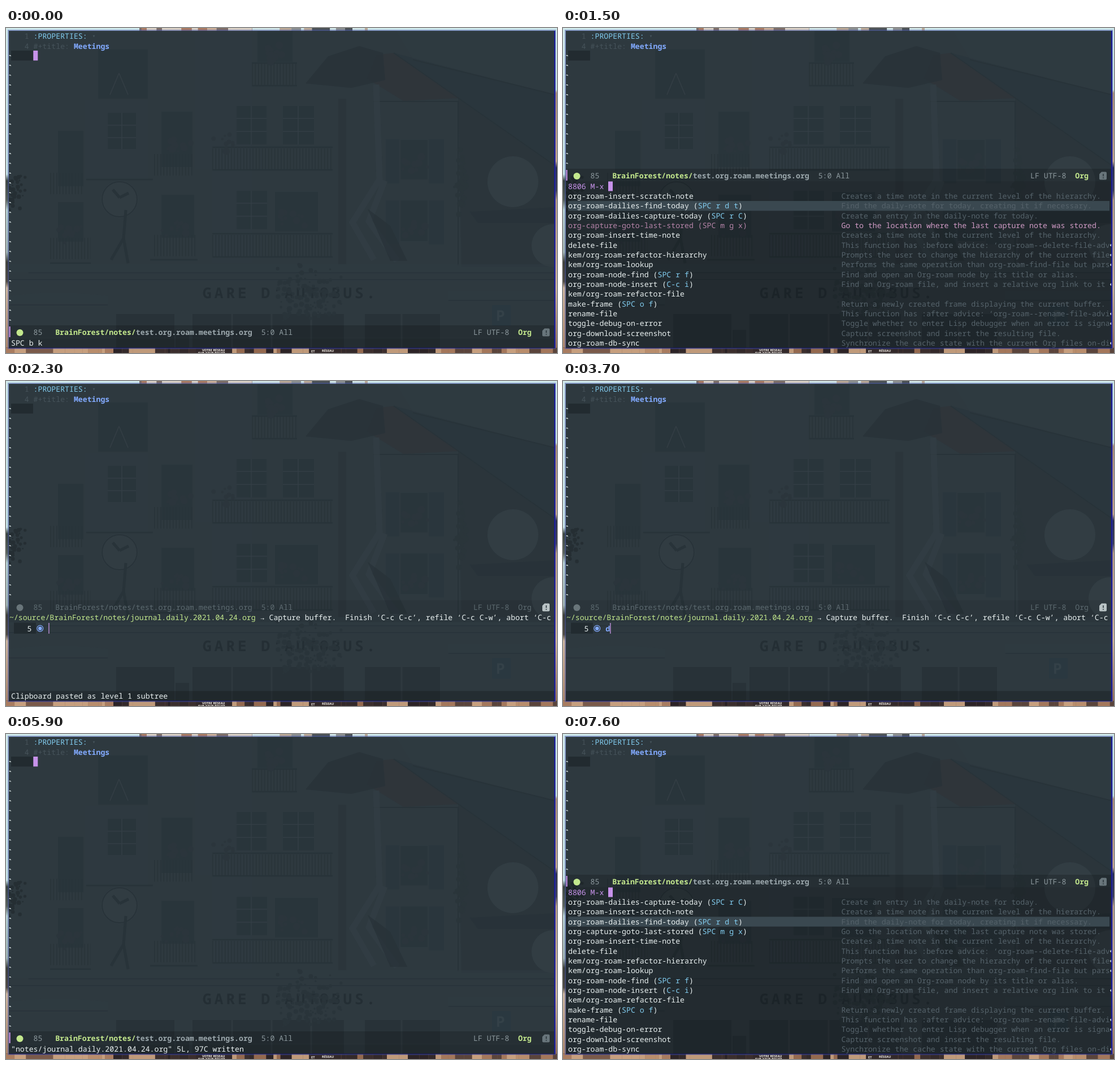
An HTML page that plays this animation: 975x575 px, repeating every 8000 ms.

```html
<!DOCTYPE html>
<html lang="en">
<head>
<meta charset="utf-8">
<title>Daily capture</title>
<style>
  html, body { margin: 0; width: 100%; height: 100%; overflow: hidden; background: #2d383e; }
  svg { display: block; width: 975px; height: 575px; }
  text {
    font: 13.21px "Noto Sans Mono", "DejaVu Sans Mono", monospace;
    white-space: pre; text-rendering: geometricPrecision; fill: #e9f0f0;
  }
  .bold { font-weight: 700; }
  .medium { font-weight: 600; }
  .faint { fill: #46535a; }
  .desc { fill: #55626a; }
  .grey { fill: #8b979c; }
  .file { fill: #9ba7ac; }
  .green { fill: #c3e88d; }
  .blue { fill: #82aaff; }
  .key { fill: #82cdf0; }
  .purple { fill: #c792ea; }
  .hover { fill: #b583a8; }
  .hoverDesc { fill: #cf9ac4; }
  .off { fill: #5c696f; }
  .sign { font: 700 26px "Noto Sans Mono", monospace; letter-spacing: 5.1px; fill: #1a252b; }
  .tiny { font: 700 5.6px "Open Sans", sans-serif; fill: #f4efe8; }
  .dark { fill: #25323a; }
  .deep { fill: #222c32; }
  .light { fill: #354148; }
  .line { fill: none; stroke: #222e35; }
  .pale { fill: none; stroke: #3a464d; }
</style>
</head>
<body>
<svg viewBox="0 0 975 575">
  <defs>
    <linearGradient id="leftEdge" x2="0" y2="1">
      <stop offset="0" stop-color="#d3ebed"/><stop offset=".45" stop-color="#c6e2e6"/>
      <stop offset=".47" stop-color="#37413c"/><stop offset=".53" stop-color="#55605b"/>
      <stop offset=".56" stop-color="#b5cfd2"/><stop offset=".69" stop-color="#9fb2b1"/>
      <stop offset=".72" stop-color="#3a3c35"/><stop offset=".78" stop-color="#4c4740"/>
      <stop offset=".8" stop-color="#cdb6a0"/><stop offset="1" stop-color="#a98266"/>
    </linearGradient>
    <linearGradient id="rightEdge" x2="0" y2="1">
      <stop offset="0" stop-color="#cfe9ec"/><stop offset=".19" stop-color="#c3dfe2"/>
      <stop offset=".2" stop-color="#a98b78"/><stop offset=".41" stop-color="#c5a58d"/>
      <stop offset=".43" stop-color="#20244e"/><stop offset=".5" stop-color="#343655"/>
      <stop offset=".53" stop-color="#b79a84"/><stop offset=".8" stop-color="#d2b69b"/>
      <stop offset="1" stop-color="#8d6650"/>
    </linearGradient>
    <clipPath id="inside"><rect x="5" y="5" width="966" height="561"/></clipPath>
  </defs>

  <rect width="975" height="575" fill="#d0eaec"/>
  <g id="roofline"></g>
  <rect width="6" height="575" fill="url(#leftEdge)"/>
  <rect x="969" width="6" height="575" fill="url(#rightEdge)"/>
  <rect y="565" width="975" height="10" fill="#8a6450"/>
  <g id="shopfront"></g>
  <path d="M336 565h64v10h-64zM536 565h56v10h-56z" fill="#33292a"/>
  <text class="tiny" x="347" y="572">VOTRE RÉSEAU</text>
  <text class="tiny" x="340" y="577">SUR AZUR ROUTE</text>
  <text class="tiny" x="540" y="574">ET</text>
  <text class="tiny" x="559" y="573">RÉSEAU</text>

  <rect x="4" y="4" width="968" height="563" fill="none" stroke="#4454a8" stroke-width="2" opacity=".5"/>
  <g clip-path="url(#inside)">
    <rect x="5" y="5" width="966" height="561" fill="#2e393f"/>
    <g id="photo" opacity=".48">
      <path class="light" d="M690 5h281v112L720 55z" opacity=".55"/>
      <path class="dark" d="M686 44L971 118V243L800 125z" opacity=".6"/>
      <path d="M655 48l30-4 118 80-100 5-65-40z" fill="#303238"/>
      <path class="line" d="M686 44L971 243M720 56L971 118M650 130h150v290" stroke-width="2"/>
      <path class="deep" d="M588 125h14v293h-14zM800 125l171 118v180H806z" opacity=".45"/>
      <path class="light" d="M140 128h112v140H140zM335 5h100v410h-70V250h-30z" opacity=".35"/>
      <path class="dark" d="M163 38h88v87h-88zM92 182h45v98H92zM275 148h55v98h-55zM180 150h50v64h-50zM408 138h53v68h-53zM490 138h55v68h-55zM408 288h54v68h-54zM476 290h76v70h-76zM92 308h45v70H92zM275 295h58v76h-58zM445 5h62v55h-62z"/>
      <path d="M672 197h24v78h-24zM748 197h27v78h-27zM672 305h24v78h-24zM748 305h27v78h-27z" fill="#27363d"/>
      <path class="dark" d="M698 198h48v70h-48zM698 305h48v72h-48z"/>
      <path class="pale" d="M205 150v64M180 172h50M180 194h50M434 138v68M408 160h53M408 183h53M517 138v68M490 160h55M490 183h55M434 288v68M408 310h54M408 333h54M200 80l-16 38M200 80l16 38" stroke-width="1.5"/>
      <path class="line" d="M365 232h213M365 385h213M435 82h80M78 275h58M78 390h72M262 242h70M262 385h74" stroke-width="38" stroke-dasharray="1.5 4"/>
      <path class="line" d="M365 211h213M365 251h213M365 364h213M365 405h213M435 62h80M435 102h80M142 268h118M255 410h84M78 416h72" stroke-width="2.5"/>
      <path class="pale" d="M655 100l6 168-48 76 38 66M670 270l-28 72 50 70" stroke-width="11" opacity=".75"/>
      <path class="deep" d="M530 98l40-48 55-18 42 12 4 48-60 14zM640 320l40 30 30 62h-30z" opacity=".7"/>
      <circle class="light" cx="201" cy="303" r="33"/>
      <circle class="line" cx="201" cy="303" r="31" stroke-width="2"/>
      <path class="line" d="M201 300l-12-14m12 14l16-8M212 322l-4 50-22 38m22-38l8 44" stroke-width="5"/>
      <circle cx="897" cy="272" r="45" fill="#38444a"/>
      <circle cx="968" cy="385" r="38" fill="#38444a"/>
      <path class="deep" d="M820 325l151-8v28H835z" opacity=".6"/>
      <path class="light" d="M5 418h966v14H5zM5 474q85-12 175 0v14H5zM783 466h188v14H783z" opacity=".55"/>
      <path class="line" d="M40 433h931M5 490h175M783 482h188M5 445h966" stroke-width="2" opacity=".6"/>
      <path class="deep" d="M195 506h103v60H195zM330 506h268v60H330zM635 506h133v60H635zM300 534h24v32h-24z"/>
      <path class="pale" d="M400 506v60M470 506v60M540 506v60M700 506v60" stroke-width="3" opacity=".6"/>
      <rect x="860" y="490" width="33" height="37" rx="3" fill="#263a44"/>
      <text class="sign" x="867" y="518" style="fill:#3b4c54">P</text>
      <text class="sign" x="348" y="478">GARE D’AUTOBUS.</text>
    </g>
    <g id="ui"></g>
  </g>
  <path d="M971 5v561" stroke="#1c1c9c" stroke-width="2"/>
  <path d="M5 566h966" stroke="#17175e" stroke-width="1"/>
</svg>
<script>
const LOOP = 8000, LINE = 17.33, ASCENT = 13.4, COL = 7.925;
const byId = id => document.getElementById(id);
const ui = byId('ui');

// Small seeded generator for foliage, crowds and the strips of street around the window.
let seed = 7;
const random = () => (seed = seed * 16807 % 2147483647) / 2147483647;
function scatter(cx, cy, w, h, count, size, color) {
  let out = '';
  for (let i = 0; i < count; i++) {
    const x = cx + (random() + random() - 1) * w, y = cy + (random() + random() - 1) * h;
    out += `<circle cx="${x.toFixed(1)}" cy="${y.toFixed(1)}" r="${(size * (.4 + random())).toFixed(1)}" fill="${color}"/>`;
  }
  return out;
}

const esc = s => s.replace(/&/g, '&amp;').replace(/</g, '&lt;');
const span = (s, cls = '') => `<tspan class="${cls}">${esc(s)}</tspan>`;
const text = (x, y, ...spans) => `<text x="${x}" y="${y.toFixed(2)}">${spans.join('')}</text>`;
const rect = (x, y, w, h, fill, opacity = 1) =>
  `<rect x="${x}" y="${y}" width="${w}" height="${h}" fill="${fill}" opacity="${opacity}"/>`;
const shade = (top, bottom, opacity) => rect(5, top, 966, bottom - top, '#000', opacity);

function bars(left, right, top, height, colors) {
  let out = '';
  for (let x = left; x < right;) {
    const width = Math.min(4 + random() * 18, right - x);
    out += rect(x.toFixed(1), top, width.toFixed(1), height, colors[Math.floor(random() * colors.length)]);
    x += width;
  }
  return out;
}

byId('roofline').innerHTML =
  bars(236, 436, 0, 5, ['#a97a62', '#c9ad97', '#d8cfc4', '#7d6d66']) +
  bars(436, 640, 0, 5, ['#4a5054', '#cfe3e4', '#b9a795', '#8b8f90']);
byId('shopfront').innerHTML =
  bars(0, 190, 566, 9, ['#a97c60', '#c79f7e', '#7a5a4a', '#b98d6c']) +
  bars(190, 770, 566, 9, ['#2c2326', '#3b2e2d', '#33292a', '#94694f', '#c09a7a']) +
  bars(770, 975, 566, 9, ['#a4775b', '#c79f7e', '#5a443b', '#b98d6c']);
byId('photo').insertAdjacentHTML('beforeend',
  scatter(535, 470, 62, 52, 130, 3.5, '#253037') +
  scatter(12, 290, 26, 38, 50, 3, '#1c2529') +
  scatter(805, 270, 14, 75, 30, 5, '#273238') +
  [[110, 362], [298, 350], [390, 205], [505, 335], [722, 240], [722, 355], [470, 45], [300, 205]]
    .map(([x, y]) => scatter(x, y, 28, 18, 12, 5, '#29343b')).join(''));

function buffer(rows, cursor) {
  let out = rect(9, 40, 39, 17.5, '#222b30') +
    text(32.8, 19.2, span('1', 'faint')) +
    text(48.6, 19.2, span(':PROPERTIES:', 'key'), span(' ▾', 'faint')) +
    text(32.8, 36.6, span('4', 'faint')) +
    text(48.6, 36.6, span('#+title: ', 'faint'), span('Meetings', 'blue bold'));
  for (let i = 0; i < rows; i++)
    out += `<path d="M5.8 ${49.2 + i * LINE}q1.2-2 2.8.6" fill="none" stroke="#e4eeee" stroke-width="1.2"/>`;
  return out + (cursor ? rect(48.3, 40, 8, 17.5, '#c792ea') : '');
}

function modeLine(top, active = true) {
  const y = top + 17, cls = name => active ? name : 'off';
  const icon = active ? '#68757b' : '#b9c3c5';
  return shade(top, top + 22, active ? .17 : .06) +
    (active ? rect(5.5, top + 2, 2.2, 19, '#c792ea') : '') +
    `<circle cx="24.5" cy="${top + 13}" r="6" fill="${active ? '#c3e88d' : '#69757a'}"/>` +
    text(48.6, y, span('85', cls('grey'))) +
    text(87.2, y, span('BrainForest/notes/', cls('green bold')),
      span('test.org.roam.meetings.org', cls('file medium')),
      span('  5:0 All', cls('grey'))) +
    text(827, y, span('LF UTF-8', cls('grey')), span('  Org', cls('green bold'))) +
    `<path d="M953 ${top + 5.5}h7q2 0 2 2v10q0 2-2 2h-9q-2 0-2-2v-8z" fill="${icon}"/>` +
    `<path d="M956 ${top + 9}v4.5m0 1.8v1.8" stroke="#2b363c" stroke-width="1.6"/>`;
}

const echo = message => shade(548.5, 566, .2) + text(9, 562, span(message));

const main = message => buffer(28, true) + modeLine(526) + echo(message);

const capture = (typed, message = '') => {
  const end = 75.2 + typed.length * COL;
  return buffer(20, false) + modeLine(388, false) + shade(410, 427, .06) +
    text(6, 423.2, span('~/source/BrainForest/notes/journal.daily.2021.04.24.org', 'green'),
      span(' → Capture buffer.  Finish ‘C-c C-c’, refile ‘C-c C-w’, abort ‘C-c')) +
    rect(14, 427.5, 39, 19.5, '#222b30') + text(37.5, 442.6, span('5')) +
    `<circle cx="60.3" cy="437.7" r="5.4" fill="none" stroke="#82aaff" stroke-width="1.2"/>` +
    `<circle cx="60.3" cy="437.7" r="3.3" fill="#82aaff"/>` +
    text(75.2, 442.6, span(typed, 'blue bold')) +
    rect(end.toFixed(1), 428, 1.5, 19, '#b48cd2') + echo(message);
};

// Each command: name, key binding, description.
const captureToday = ['org-roam-dailies-capture-today', 'SPC r C', 'Create an entry in the daily-note for today.'];
const scratch = ['org-roam-insert-scratch-note', '', 'Creates a time note in the current level of the hierarchy.'];
const findToday = ['org-roam-dailies-find-today', 'SPC r d t', 'Find the daily-note for today, creating it if necessary.'];
const others = [
  ['org-capture-goto-last-stored', 'SPC m g x', 'Go to the location where the last capture note was stored.'],
  ['org-roam-insert-time-note', '', 'Creates a time note in the current level of the hierarchy.'],
  ['delete-file', '', 'This function has :before advice: ‘org-roam--delete-file-adv'],
  ['kem/org-roam-refactor-hierarchy', '', 'Prompts the user to change the hierarchy of the current file'],
  ['kem/org-roam-lookup', '', 'Performs the same operation than org-roam-find-file but pars'],
  ['org-roam-node-find', 'SPC r f', 'Find and open an Org-roam node by its title or alias.'],
  ['org-roam-node-insert', 'C-c i', 'Find an Org-roam file, and insert a relative org link to it '],
  ['kem/org-roam-refactor-file', '', ''],
  ['make-frame', 'SPC o f', 'Return a newly created frame displaying the current buffer.'],
  ['rename-file', '', 'This function has :after advice: ‘org-roam--rename-file-advi'],
  ['toggle-debug-on-error', '', 'Toggle whether to enter Lisp debugger when an error is signa'],
  ['org-download-screenshot', '', 'Capture screenshot and insert the resulting file.'],
  ['org-roam-db-sync', '', 'Synchronize the cache state with the current Org files on-di'],
];
const before = [scratch, findToday, captureToday, ...others];
const after = [captureToday, scratch, findToday, ...others];

function picker(commands, selected, { hovered = -1, prompt = true } = {}) {
  let out = buffer(12, false) + modeLine(249) + shade(271, 566, .23);
  if (prompt) out += text(9, 285, span('8806 M-x ', 'purple')) + rect(80, 271.5, 8, 17, '#c792ea');
  commands.forEach(([name, key, desc], i) => {
    const top = 288.7 + i * LINE, y = top + ASCENT, hot = i === hovered;
    if (i === selected) out += rect(9, top, 958, LINE, '#3a4850');
    const label = key
      ? [span(name + ' (', hot ? 'hover' : ''), span(key, hot ? 'hover' : 'key'), span(')', hot ? 'hover' : '')]
      : [span(name)];
    out += text(9, y, ...label) + text(492.4, y, span(desc, hot ? 'hoverDesc' : 'desc'));
    if (desc.length > 59)
      out += `<path d="M968 ${top + 9}h3m-1.5-2v4" stroke="#e4eeee" stroke-width="1.2"/>`;
  });
  return out;
}

const timeline = [
  [0, main('SPC b k')],
  [700, picker(before, 0, { hovered: 3 })],
  [1500, picker(before, 1, { hovered: 3 })],
  [1700, picker(before, 2)],
  [2100, picker(before, 2, { prompt: false })],
  [2300, capture('', 'Clipboard pasted as level 1 subtree')],
  [3700, capture('d')],
  [4100, capture('dai')],
  [4400, capture('dail')],
  [4700, capture('daili')],
  [4800, capture('dailie')],
  [4900, capture('dailies')],
  [5700, main('')],
  [5900, main('"notes/journal.daily.2021.04.24.org" 5L, 97C written')],
  [6800, picker(after, 0)],
  [7500, picker(after, 1)],
  [7600, picker(after, 2)],
];

let shown = -1;
function draw() {
  const now = performance.now() % LOOP;
  const current = timeline.findLastIndex(([start]) => start <= now);
  if (current !== shown) ui.innerHTML = timeline[shown = current][1];
  requestAnimationFrame(draw);
}
draw();
</script>
</body>
</html>
```
